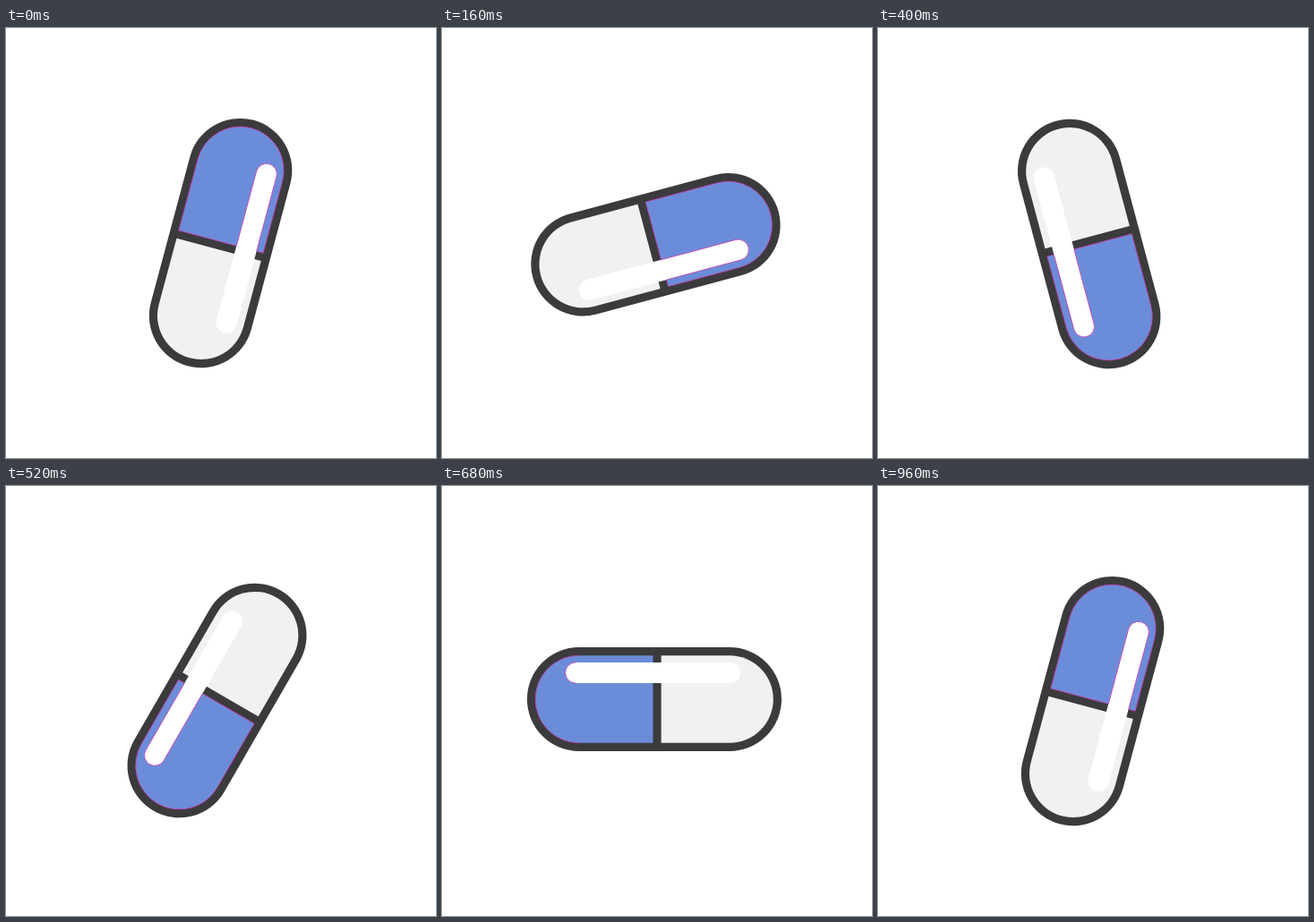
An HTML page for the animation above (1000 ms loop, 480 by 480 pixels).

```html
<!DOCTYPE html>
<html lang="en">
<head>
<meta charset="utf-8">
<title>Spinning capsule</title>
<style>
  html, body { margin: 0; width: 100%; height: 100%; overflow: hidden; background: #fff; }
  svg { display: block; width: 100%; height: 100%; }
  .rim { fill: none; stroke: #c43fae; stroke-width: .8; }
</style>
</head>
<body>
<svg viewBox="0 0 480 480">
  <g id="pill">
    <rect x="-58" y="-142" width="116" height="284" rx="58" fill="#3b3b3d"/>
    <path d="M-48.8 -1.5V-84a48.8 48.8 0 0 1 97.6 0V-1.5z" fill="#6b8dd9"/>
    <path d="M-48.8 7.7V84a48.8 48.8 0 0 0 97.6 0V7.7z" fill="#f1f1f1"/>
    <path class="rim" d="M-48.8 -84a48.8 48.8 0 0 1 97.6 0"/>
    <path class="rim side" d="M-48.8 -84V-1.5H48.8V-84"/>
    <rect x="17.9" y="-99.3" width="23.2" height="195.4" rx="11.6" fill="#fff"/>
    <path class="rim" d="M17.9 -87.7a11.6 11.6 0 0 1 23.2 0"/>
    <path class="rim side" d="M17.9 -87.7V-1.5M41.1 -87.7V-1.5"/>
  </g>
</svg>
<script>
  const LOOP = 1000, STEP = 40, TURN = 15;
  const pill = document.getElementById('pill');
  const sides = document.querySelectorAll('.side');
  const start = performance.now();

  function draw() {
    const t = (performance.now() - start) % LOOP;
    const angle = TURN * (1 + Math.floor(t / STEP));
    // The capsule sits slightly off its pivot
    pill.setAttribute('transform', `translate(237.5 240) rotate(${angle}) translate(2 -.5)`);
    // Straight rims vanish when aligned with the pixel grid
    for (const s of sides) s.style.opacity = angle % 90 ? 1 : 0;
    requestAnimationFrame(draw);
  }
  draw();
</script>
</body>
</html>
```
